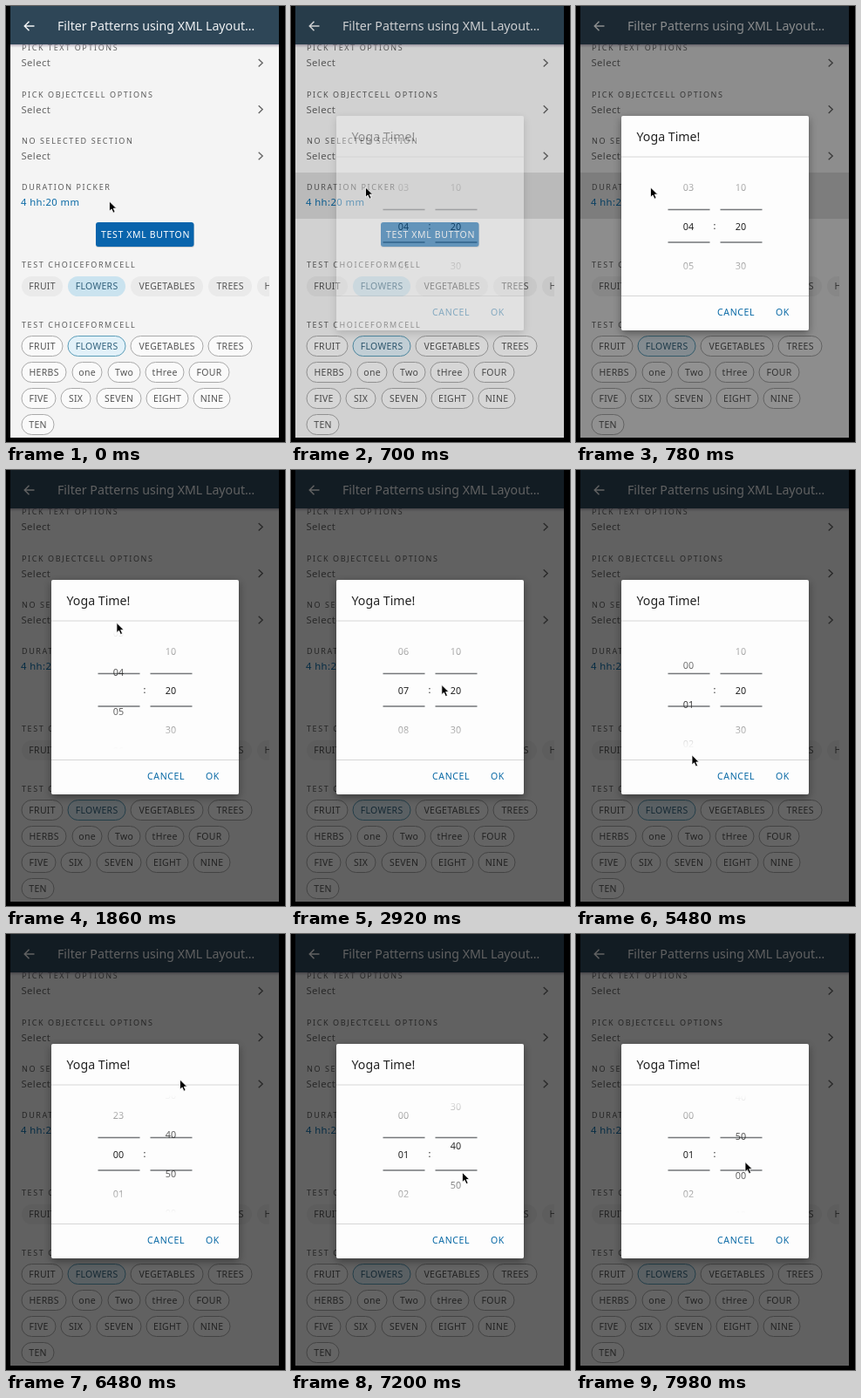
These frames come from a looping animation (320x500 px, 8 s). An HTML page:

```html
<!DOCTYPE html>
<html lang="en">
<head>
<meta charset="utf-8">
<title>Duration picker</title>
<style>
  html, body { margin: 0; width: 100%; height: 100%; overflow: hidden; background: #000; }
  svg { display: block; font-family: "Noto Sans", sans-serif; }
  .title { font-size: 14.2px; }
  .label { font-size: 9px; letter-spacing: 1.6px; fill: #5c5c5c; }
  .value { font-size: 11.3px; letter-spacing: .4px; fill: #666; }
  .button { font-size: 10.5px; letter-spacing: .65px; }
  .chip { font-size: 10.5px; letter-spacing: .3px; fill: #555; }
  .digits { font-size: 10.8px; fill: #222; text-anchor: middle; }
  .blue { fill: #0a6aa6; }
</style>
</head>
<body>
<svg width="320" height="500" viewBox="0 0 320 500">
  <defs>
    <linearGradient id="edge" gradientUnits="userSpaceOnUse" x1="0" y1="185" x2="0" y2="320">
      <stop offset="0" stop-color="#000"/>
      <stop offset=".45" stop-color="#fff"/>
      <stop offset=".55" stop-color="#fff"/>
      <stop offset="1" stop-color="#000"/>
    </linearGradient>
    <mask id="fade" maskUnits="userSpaceOnUse" x="100" y="185" width="120" height="135" style="mask-type:luminance" color-interpolation="sRGB">
      <rect x="100" y="185" width="120" height="135" fill="url(#edge)"/>
    </mask>
    <linearGradient id="barShade" x1="0" y1="0" x2="0" y2="1">
      <stop offset="0" stop-color="#8d8496" stop-opacity=".7"/>
      <stop offset="1" stop-color="#c9c3d0" stop-opacity="0"/>
    </linearGradient>
    <clipPath id="chipClip"><rect x="5" y="305" width="297" height="32"/></clipPath>
    <filter id="shadow" x="-20%" y="-20%" width="140%" height="140%">
      <feDropShadow dx="0" dy="3" stdDeviation="5" flood-opacity=".4"/>
    </filter>
  </defs>

  <rect x="5" width="308" height="495" fill="#f4f4f4"/>
  <rect id="press" x="5" y="191" width="308" height="53" fill="#000" opacity="0"/>
  <g id="page"></g>
  <rect x="103" y="249" width="113" height="28" rx="3" fill="#000" opacity=".15"/>
  <rect x="103" y="248" width="112.5" height="28" rx="3" fill="#0864ac"/>
  <text class="button" x="109" y="266" fill="#fff">TEST XML BUTTON</text>

  <rect x="5" y="44" width="308" height="4" fill="url(#barShade)"/>
  <rect x="5" width="308" height="44" fill="#2e4657"/>
  <path d="M32.5 23H21.5M26.5 17.8L21.3 23l5.2 5.2" fill="none" stroke="#f2f4f5" stroke-width="1.5"/>
  <text class="title" x="59" y="28" fill="#f0f2f4">Filter Patterns using XML Layout…</text>

  <rect id="dim" x="5" width="308" height="495" opacity="0"/>
  <g id="dialog" opacity="0">
    <rect x="52" y="126" width="215" height="246" rx="2" fill="#fdfdfd" filter="url(#shadow)"/>
    <text class="title" x="69.5" y="154.5" fill="#222">Yoga Time!</text>
    <path d="M52 173H267M52 332.5H267" stroke="#d6d6d6"/>
    <path d="M105.5 233.5h48M105.5 271h48M165.5 233.5h48M165.5 271h48" stroke="#74777a" stroke-width="1.6"/>
    <text class="digits" x="159" y="256">:</text>
    <g mask="url(#fade)"><g id="hours"></g><g id="minutes"></g></g>
    <text class="button blue" x="162" y="355.3">CANCEL</text>
    <text class="button blue" x="229" y="355.3">OK</text>
  </g>
  <path id="cursor" d="M0 0V11.2L2.6 8.9L4.5 13.2L6.6 12.3L4.7 8.1H8.2Z" fill="#000" stroke="#fff" stroke-width=".8"/>
</svg>
<script>
const LOOP = 8000, PITCH = 45, CENTER = 252.5;
const $ = id => document.getElementById(id);

function add(parent, tag, attrs, text) {
  const node = document.createElementNS("http://www.w3.org/2000/svg", tag);
  for (const key in attrs) node.setAttribute(key, attrs[key]);
  if (text) node.textContent = text;
  parent.appendChild(node);
  return node;
}

const page = $("page");
const label = (y, text) => add(page, "text", { class: "label", x: 18, y: y + 3.3 }, text);

[[48, "PICK TEXT OPTIONS"], [101.3, "PICK OBJECTCELL OPTIONS"], [154.7, "NO SELECTED SECTION"]].forEach(([y, text]) => {
  label(y, text);
  add(page, "text", { class: "value", x: 17.5, y: y + 21.2 }, "Select");
  add(page, "path", {
    d: `M289.7 ${y + 13}l4.5 4.3l-4.5 4.3`, fill: "none", stroke: "#666", "stroke-width": 1.4
  });
});
label(208, "DURATION PICKER");
add(page, "text", { class: "value blue", x: 17, y: 229, style: "fill:#0a6aa6" }, "4 hh:20 mm");
label(297, "TEST CHOICEFORMCELL");
label(365.5, "TEST CHOICEFORMCELL");

// Each chip: left, right, caption
function chips(y, items, outlined, parent = page) {
  for (const [left, right, text] of items) {
    const on = text === "FLOWERS";
    const look = outlined
      ? { fill: on ? "#e2f1f9" : "#fafafa", stroke: on ? "#5b9db8" : "#a9a9a9" }
      : { fill: on ? "#cae3ef" : "#eaeaea" };
    add(parent, "rect", { x: left, y: y - 11.5, width: right - left, height: 23, rx: 11.5, ...look });
    const caption = add(parent, "text", {
      class: "chip", x: (left + right) / 2 + .1, y: y + 3.8, "text-anchor": "middle"
    }, text);
    if (on) caption.style.fill = "#31617c";
  }
}
const plants = [[18, 65, "FRUIT"], [71, 137, "FLOWERS"], [143, 226, "VEGETABLES"], [232, 282, "TREES"]];
const strip = add(page, "g", { "clip-path": "url(#chipClip)" });
chips(321.5, [...plants, [288, 339, "HERBS"]], false, strip);
chips(390, plants, true);
chips(420, [[18, 69, "HERBS"], [76, 110, "one"], [117, 154, "Two"], [160, 204, "tHree"], [210, 256, "FOUR"]], true);
chips(450, [[18, 57, "FIVE"], [63, 97, "SIX"], [104, 155, "SEVEN"], [161, 209, "EIGHT"], [215, 257, "NINE"]], true);
chips(480, [[18, 55, "TEN"]], true);

function wheel(id, x, count, step) {
  const rows = Array.from({ length: 5 }, () => add($(id), "text", { class: "digits", x }));
  return pos => {
    const base = Math.round(pos);
    rows.forEach((row, i) => {
      const index = base + i - 2;
      const value = ((index % count) + count) % count * step;
      row.textContent = String(value).padStart(2, "0");
      row.setAttribute("y", CENTER + 4 + (index - pos) * PITCH);
    });
  };
}
const showHours = wheel("hours", 129, 24, 1);
const showMinutes = wheel("minutes", 189, 6, 10);

// Tracks: time, then one or two values
const cursorTrack = [
  [20, 118.5, 224], [280, 85.5, 208], [820, 85.5, 208], [1440, 117.5, 265.5], [1480, 118, 266],
  [1580, 128, 268], [1720, 128, 268], [1860, 127.5, 176], [1980, 60, 92], [2160, 120, 180],
  [2400, 186, 338], [2520, 189, 318], [2920, 173, 246.5], [3340, 112, 204], [3620, 128, 341],
  [3850, 182, 290], [4160, 132.5, 250], [4260, 132.5, 274.5], [4800, 133, 322], [5340, 133, 322],
  [5500, 133, 327.5], [5680, 133, 327.5], [6100, 195, 258], [6460, 199.5, 167], [6520, 199.5, 167],
  [7320, 196, 292], [7580, 196, 292], [7740, 196, 301], [7980, 194, 261.5]
];
const hourTrack = [
  [1720, 4], [1780, 4.05], [1860, 4.45], [2000, 5.8], [2160, 6.6], [2400, 7], [3360, 7],
  [3620, 4.2], [3900, 2.9], [4160, 2.4], [4260, 2.15], [4800, .85], [5340, .85], [5500, .6],
  [5680, .6], [5800, .15], [5960, 0]
];
const minuteTrack = [
  [6100, 2], [6200, 2.3], [6360, 3.6], [6480, 4.48], [6700, 7], [7000, 9.4], [7320, 10.7],
  [7580, 11], [7740, 11], [7860, 11.1], [7980, 11.46]
];
const dimTrack = [[660, 0], [780, .42], [860, .6]];
const dialogTrack = [[660, 0], [770, 1]];
const pressTrack = [[650, 0], [680, .11], [850, .11], [1050, 0]];

function sample(track, t) {
  const next = track.findIndex(key => key[0] > t);
  if (next === 0) return track[0].slice(1);
  if (next < 0) return track[track.length - 1].slice(1);
  const a = track[next - 1], b = track[next];
  const k = (t - a[0]) / (b[0] - a[0]);
  return a.slice(1).map((v, i) => v + (b[i + 1] - v) * k);
}

function draw(t) {
  const [x, y] = sample(cursorTrack, t);
  $("cursor").setAttribute("transform", `translate(${x} ${y})`);
  const [minute] = sample(minuteTrack, t);
  // The hour carries when the minutes wrap past 50
  showHours(sample(hourTrack, t)[0] + Math.floor((minute + .5) / 6));
  showMinutes(minute);
  $("dim").setAttribute("opacity", sample(dimTrack, t)[0]);
  $("dialog").setAttribute("opacity", sample(dialogTrack, t)[0]);
  $("press").setAttribute("opacity", sample(pressTrack, t)[0]);
}

const start = performance.now();
function tick() {
  draw((performance.now() - start) % LOOP);
  requestAnimationFrame(tick);
}
tick();
</script>
</body>
</html>
```
